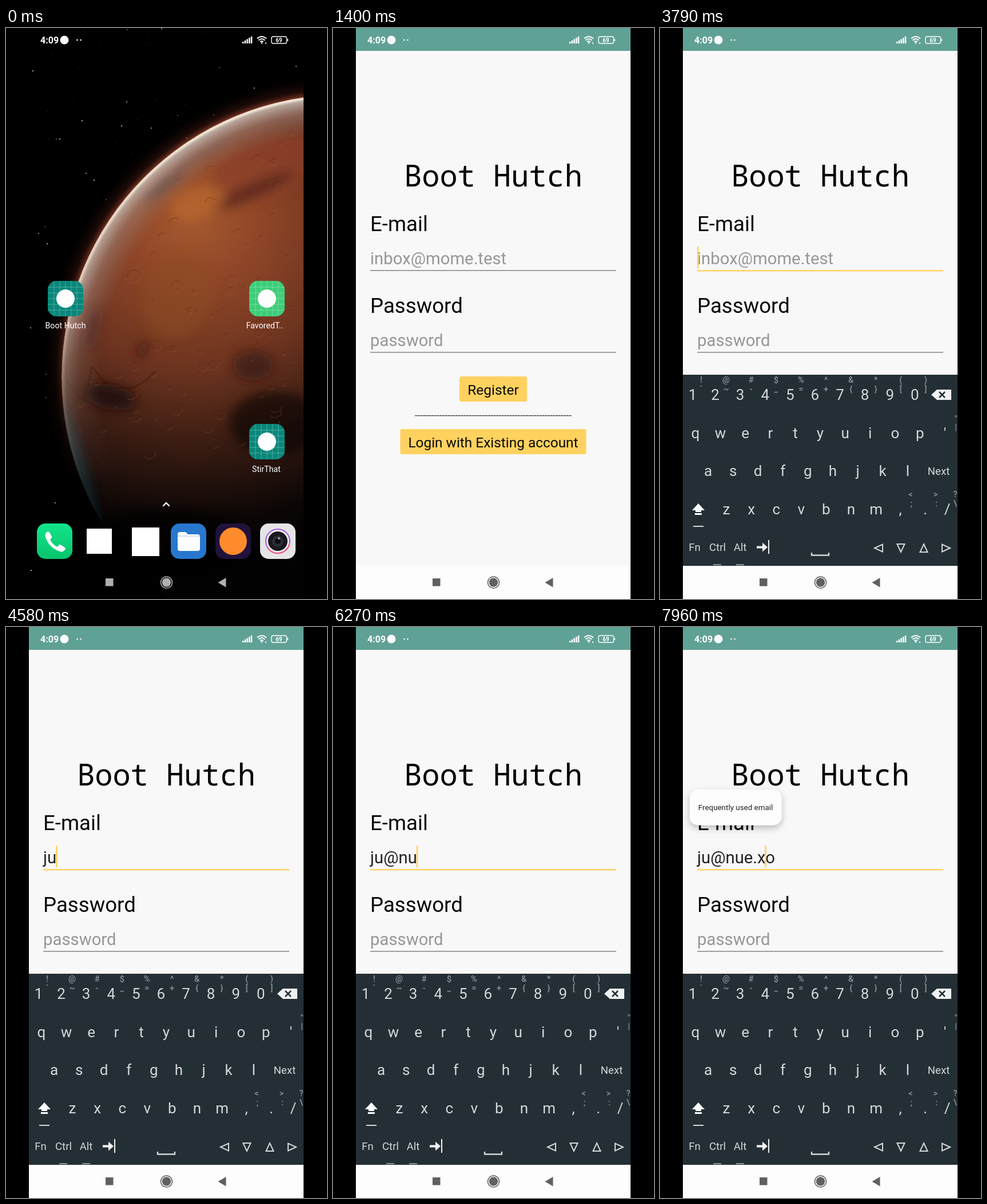
An HTML page that plays this animation: 561 px wide and 998 px high, repeating every 8 s.

```html
<!DOCTYPE html>
<html lang="en">
<head>
<meta charset="utf-8">
<title>Sign-up on a phone</title>
<style>
  html, body { margin: 0; height: 100%; overflow: hidden; background: #000; }
  svg { display: block; width: 561px; height: 998px; font-family: Roboto, sans-serif; }
</style>
</head>
<body>
<svg id="stage" viewBox="0 0 561 998" xmlns="http://www.w3.org/2000/svg">
  <defs>
    <clipPath id="screen"><rect x="40" width="480" height="998"/></clipPath>
    <clipPath id="aboveNav"><rect x="40" width="480" height="940"/></clipPath>
    <clipPath id="window"><rect id="windowRect"/></clipPath>
    <clipPath id="disc"><circle cx="591" cy="610" r="494"/></clipPath>
    <radialGradient id="ground" gradientUnits="userSpaceOnUse" cx="325" cy="330" r="600">
      <stop offset="0" stop-color="#a65a2f"/><stop offset=".2" stop-color="#8f4628"/>
      <stop offset=".45" stop-color="#6b331f"/><stop offset=".68" stop-color="#361a11"/>
      <stop offset=".88" stop-color="#0d0706"/><stop offset="1" stop-color="#020202"/>
    </radialGradient>
    <radialGradient id="rim" gradientUnits="userSpaceOnUse" cx="591" cy="610" r="494">
      <stop offset=".86" stop-color="#94807a" stop-opacity="0"/>
      <stop offset=".94" stop-color="#a08c86" stop-opacity=".5"/>
      <stop offset=".985" stop-color="#c4bab2" stop-opacity=".85"/>
      <stop offset=".995" stop-color="#f6eee0"/><stop offset="1" stop-color="#e8b9a0"/>
    </radialGradient>
    <radialGradient id="halo" gradientUnits="userSpaceOnUse" cx="591" cy="610" r="528">
      <stop offset=".935" stop-color="#94422e" stop-opacity=".75"/>
      <stop offset=".955" stop-color="#5a2016" stop-opacity=".35"/>
      <stop offset="1" stop-color="#200806" stop-opacity="0"/>
    </radialGradient>
    <linearGradient id="fade" gradientUnits="userSpaceOnUse" x1="220" y1="200" x2="220" y2="800">
      <stop offset="0" stop-color="#fff"/><stop offset=".4" stop-color="#ddd"/>
      <stop offset=".75" stop-color="#555"/><stop offset="1" stop-color="#000"/>
    </linearGradient>
    <mask id="lit"><rect width="561" height="998" fill="url(#fade)"/></mask>
    <linearGradient id="green" x2="0" y2="1"><stop stop-color="#12e58a"/><stop offset="1" stop-color="#08c46c"/></linearGradient>
    <filter id="soft" x="-50%" y="-50%" width="200%" height="200%"><feGaussianBlur stdDeviation="9"/></filter>
    <filter id="drop" x="-30%" y="-30%" width="160%" height="180%"><feDropShadow dx="0" dy="5" stdDeviation="6" flood-opacity=".25"/></filter>
  </defs>
  <g id="home" clip-path="url(#screen)"></g>
  <g clip-path="url(#window)"><g id="app"></g></g>
  <g id="keyboard" clip-path="url(#aboveNav)"></g>
  <g id="bars"></g>
</svg>
<script>
const $ = id => document.getElementById(id);
const esc = s => s.replace(/&/g, '&amp;').replace(/</g, '&lt;');
const text = (x, y, s, size, fill, extra = '') =>
  `<text x="${x}" y="${y}" font-size="${size}" fill="${fill}" ${extra}>${esc(s)}</text>`;
const mid = (x, y, s, size, fill, extra = '') => text(x, y, s, size, fill, 'text-anchor="middle" ' + extra);
const rect = (x, y, w, h, fill, extra = '') =>
  `<rect x="${x}" y="${y}" width="${w}" height="${h}" fill="${fill}" ${extra}/>`;
const circle = (x, y, r, fill, extra = '') => `<circle cx="${x}" cy="${y}" r="${r}" fill="${fill}" ${extra}/>`;
const path = (d, fill, extra = '') => `<path d="${d}" fill="${fill}" ${extra}/>`;
const range = (n, f) => Array.from({ length: n }, (_, i) => f(i)).join('');
let seed = 7;
const random = () => (seed = seed * 16807 % 2147483647) / 2147483647;
const clamp = v => Math.min(1, Math.max(0, v));
const progress = (t, from, to) => clamp((t - from) / (to - from));
const easeOut = p => 1 - (1 - p) ** 3;
const show = (id, on) => $(id).setAttribute('visibility', on ? 'inherit' : 'hidden');
const YELLOW = '#ffd25f';

// Home screen
const stars = [373,69, 211,129, 133,162, 300,153, 254,175, 316,192, 363,152, 507,67, 94,194, 88,194, 140,254,
  154,266, 68,347, 57,359, 72,377, 70,605, 86,830, 44,948, 70,646, 43,524, 47,75, 212,3, 272,1, 202,171, 175,300, 434,105];
const patch = (x, y, rx, ry, turn, fill, alpha) =>
  `<ellipse rx="${rx}" ry="${ry}" transform="translate(${x} ${y}) rotate(${turn})" fill="${fill}" opacity="${alpha}"/>`;
const crater = () => {
  const x = 130 + random() * 385, y = 170 + random() * 580, r = 1 + random() ** 4 * 11;
  return path(`M${x - r} ${y}a${r} ${r} 0 0 1 ${r * 1.7} ${-r * .7}`, 'none', 'stroke="#30150c"') +
    path(`M${x + r} ${y}a${r} ${r} 0 0 1 ${-r * 1.7} ${r * .7}`, 'none', 'stroke="#b86c40"');
};
const planet = circle(591, 610, 528, 'url(#halo)', 'mask="url(#lit)"') +
  `<g clip-path="url(#disc)">${circle(591, 610, 494, 'url(#ground)')}<g filter="url(#soft)">` +
  patch(450, 245, 100, 50, -25, '#8a402c', .7) + patch(276, 274, 46, 10, -38, '#40312d', .75) +
  patch(430, 285, 80, 14, -24, '#4c2118', .6) + patch(345, 215, 60, 12, -30, '#6c3a2c', .6) +
  patch(335, 305, 50, 28, -20, '#bd6a30', .6) + patch(300, 470, 60, 75, 20, '#8c4a22', .5) +
  patch(182, 645, 46, 22, 12, '#1d100c', .85) + patch(150, 525, 10, 40, 14, '#40201a', .7) +
  patch(238, 562, 8, 16, 25, '#30170f', .6) + patch(432, 590, 36, 26, 0, '#27130d', .55) +
  patch(470, 690, 80, 55, 0, '#0c0605', .55) + patch(280, 900, 150, 60, 0, '#030202', .7) +
  patch(120, 760, 18, 110, -17, '#14313d', .6) + '</g>' +
  `<g opacity=".35">${range(170, crater)}</g>` +
  path('M104 612l20 30 14 10 12-60 22 26 12 10 36 2 22-12 20-18', 'none', 'stroke="#301008" stroke-width="1.5" opacity=".6"') +
  circle(591, 610, 494, 'url(#rim)', 'mask="url(#lit)"') + '</g>';

const tile = (x, y, fill) => rect(x, y, 62, 62, fill, 'rx="15"');
const gridIcon = (x, y, fill) => tile(x, y, fill) +
  path(range(5, i => `M${x + 11 + i * 10} ${y}v62M${x} ${y + 11 + i * 10}h62`), 'none', 'stroke="#fff" stroke-opacity=".28"') +
  circle(x + 31, y + 31, 16, '#fff');
const dock = tile(54, 866, 'url(#green)') +
  path('M73 880q-6 3-4 10q6 18 25 25q7 2 10-5q0-2-9-7q-2-1-5 4q-9-4-13-13q4-3 3-5q-4-9-7-9z', '#fff') +
  rect(141, 875, 44, 44, '#fff') + rect(220, 873, 48, 50, '#fff') +
  tile(288, 866, '#2877cf') + path('M300 885q0-4 4-4h10l4 4h17q4 0 4 4v21q0 4-4 4h-31q-4 0-4-4z', '#fff') +
  rect(300, 887, 39, 2, '#cfe0f2') +
  tile(366, 866, '#21123c') + circle(397, 897, 24, '#ff8b2c') +
  tile(444, 866, '#e5e4e6') + circle(475, 897, 21, '#f3eff5', 'stroke="#9f56de" stroke-width="2"') +
  path('M457 908a21 21 0 0 0 38-5', 'none', 'stroke="#f2587a" stroke-width="2"') +
  circle(475, 897, 17, '#17191e') + circle(475, 897, 10, '#2a2e38') + circle(475, 897, 5, '#0b0c10') + circle(477, 892, 2, '#98a2b5');

$('home').innerHTML = range(stars.length / 2, i => circle(stars[2 * i], stars[2 * i + 1], .7 + i % 3 * .2, '#ccc')) +
  range(30, () => circle(45 + random() * 300, random() * 230, .5, '#555')) + planet + '<g id="icons">' +
  gridIcon(73, 442, '#08877a') + gridIcon(425, 442, '#3dcd79') + gridIcon(425, 692, '#08877a') +
  mid(104, 525, 'Boot Hutch', 14.2, '#fff') + mid(452, 525, 'FavoredT..', 14.2, '#fff') + mid(455, 776, 'StirThat', 14.2, '#fff') +
  path('M275 835l5-5 5 5', 'none', 'stroke="#fff" stroke-width="2.4" stroke-linecap="round"') + dock + '</g>';

// Sign-up page
const button = (x, y, w, s) => rect(x, y, w, 44, YELLOW, 'rx="3"') + mid(x + w / 2, y + 32, s, 24.4, '#0a0a0a');
$('app').innerHTML = rect(40, 0, 480, 998, '#f8f8f8') + rect(40, 0, 480, 40, '#60a196') + '<g id="form">' +
  mid(280, 277, 'Boot Hutch', 52, '#000', 'style="font-family:\'Noto Sans Mono\',monospace"') +
  text(65, 355, 'E-mail', 36.65, '#0a0a0a') + text(65, 498, 'Password', 36.65, '#0a0a0a') +
  text(65, 413, 'inbox@mome.test', 29.3, '#979797', 'id="hint"') + text(65, 413, '', 29.3, '#222', 'id="input"') +
  rect(65, 423, 430, 1.6, '#8b8b8b', 'id="line"') + rect(65, 382, 2.6, 38, YELLOW, 'id="caret"') +
  text(65, 556, 'password', 29.3, '#979797') + rect(65, 566, 430, 1.6, '#8b8b8b') +
  button(221, 609, 118, 'Register') + mid(280, 683, '-'.repeat(58), 17.1, '#222') +
  button(117.5, 701, 325, 'Login with Existing account') +
  '<g id="tip">' + rect(52, 284, 160.5, 62.5, '#fdfdfd', 'rx="15" filter="url(#drop)"') +
  mid(132, 320, 'Frequently used email', 13.4, '#222') + '</g></g>' + rect(40, 940, 480, 58, '#fdfdfd');

// Keyboard
const PITCH = 43.6, KEY = '#d3d8da', DIM = '#8b959a', ROW = 66.75;
const rowTop = r => 606 + ROW * r;
const labels = (s, x, y) => [...s].map((c, i) => mid(x + PITCH * i, y, c, 26, KEY)).join('');
const hints = (s, x, y) => [...s].map((c, i) => mid(x + PITCH * i, y, c, 14.5, DIM, 'font-weight="500"')).join('');
const layer = (id, digits, change) => `<g id="${id}">` + labels(digits[0], 57, 650) + labels(digits.slice(1), 96.5, 650) +
  labels(change('qwertyuiop'), 62, 717) + labels(change('asdfghjkl'), 84, 783) + labels(change('zxcvbnm'), 116, 850) + '</g>';
const arrow = (x, turn) => path('M-7 0L7-6.5V6.5Z', 'none', `transform="translate(${x} 909) rotate(${turn})" stroke="${KEY}" stroke-width="2"`);
$('keyboard').innerHTML = '<g id="keys">' + rect(40, 606, 480, 334, '#242f35') + rect(0, 0, 44, ROW, '#454c51', 'id="pressed"') +
  layer('lower', '1234567890', s => s) + layer('upper', '!@#$%^&*()', s => s.toUpperCase()) +
  '<g id="hints">' + hints('!@#$%^&*()', 72, 620) + hints('`~-_=+{}[]', 72, 636) +
  hints('"', 517, 688) + hints('|', 517, 703) + hints('<>', 438, 820) + hints(';:', 439.5, 836) +
  hints('?', 516, 820) + hints('\\', 516, 836) + '</g>' +
  mid(498, 717, "'", 26, KEY) + labels(',.', 420, 850) + mid(502, 850, '/', 26, KEY) +
  path('M474 641l10-9h25v18h-25z', '#f0f2f2') + path('M488 636l10 10m0-10l-10 10', 'none', 'stroke="#242f35" stroke-width="2.5"') +
  mid(487, 781, 'Next', 18.6, KEY) + path('M67 831l11 12h-6v3h-10v-3h-6zM61 848h12v3h-12z', '#fff') +
  rect(58, 870, 18, 2, KEY, 'id="shiftBar"') + rect(93, 937, 14, 2, DIM) + rect(133, 937, 14, 2, DIM) +
  mid(60.5, 914, 'Fn', 18.6, KEY) + mid(100.5, 914, 'Ctrl', 18.6, KEY) + mid(140, 914, 'Alt', 18.6, KEY) +
  path('M169 905.5h10v-6l9 8-9 8v-6h-10zM189 895h2v24h-2z', '#f0f2f2') +
  path('M265 917v4.5h30v-4.5', 'none', `stroke="${KEY}" stroke-width="2.4"`) +
  arrow(382, 0) + arrow(421, -90) + arrow(461, 90) + arrow(500, 180) +
  '<g id="popup">' + rect(0, 0, 69, 81, '#000', 'filter="url(#drop)"') +
  range(3, i => circle(47 + i * 6.5, 71, 2.2, '#fff')) + '</g></g>';

// Status and navigation bars
$('bars').innerHTML = '<g fill="#fff">' + text(60, 27, '4:09', 16, '#fff', 'font-weight="600"') + circle(102, 21, 7.5, '#fff') +
  circle(124.5, 21, 1.3, '#fff') + circle(130.5, 21, 1.3, '#fff') +
  range(5, i => rect(413 + i * 3.7, 24 - i * 2.3, 2.5, 3 + i * 2.3, '#fff')) +
  path('M439 18.5q8-7 16 0M441.5 21.5q5.5-5 11 0M444.3 24.3q2.7-2.4 5.4 0', 'none', 'stroke="#fff" stroke-width="2"') +
  circle(447, 26.3, 1.3, '#fff') + circle(454, 26.5, 1.2, '#fff') +
  rect(464, 15, 26.5, 12, 'none', 'rx="3" stroke="#fff" stroke-width="1.4"') + rect(491.5, 19, 1.6, 4, '#fff') +
  mid(477, 24.6, '69', 10, '#fff', 'font-weight="600"') + '</g><g id="nav">' +
  '<path d="M174 962h13.5v13.5h-13.5zM384.5 961v16.5l-14-8.25z"/><circle cx="280.5" cy="969" r="7.7"/>' +
  '<circle cx="280.5" cy="969" r="10" fill="none" stroke="currentColor" stroke-width="1.5"/></g>';

// Key, press time, release time, centre, row; text changes on release
const presses = [['j', 4210, 4310, 345, 2], ['u', 4480, 4580, 323.5, 1], ['shift', 4800, 4900, 67, 3], ['@', 5110, 5210, 105, 0],
  ['n', 5860, 5960, 333.5, 3], ['u', 6150, 6250, 323.5, 1], ['e', 6460, 6560, 149, 1], ['.', 6850, 6950, 464, 3],
  ['x', 7090, 7190, 159, 3], ['o', 7290, 7390, 410.5, 1], ['left', 7520, 7620, 382, 4]];
const widths = { shift: 54, left: 39 };
const LAUNCH = 690, TAP = 2680, FOCUS = 2765;

// The blank window grows out of the icon, then the form appears in it
function drawWindow(t) {
  const p = progress(t, LAUNCH, LAUNCH + 400), e = easeOut(p);
  const x = 73 - 33 * e, y = 442 * (1 - e), w = 62 + 418 * e, h = 62 + 936 * e;
  const box = { x, y, width: w, height: h, rx: 15 + 45 * p * (1 - p) - 15 * p };
  for (const k in box) $('windowRect').setAttribute(k, box[k]);
  $('app').setAttribute('transform', `translate(${x} ${y}) scale(${w / 480}) translate(-40 0)`);
  $('app').setAttribute('opacity', progress(t, LAUNCH, LAUNCH + 100));
  $('form').setAttribute('opacity', progress(t, LAUNCH + 390, LAUNCH + 500));
  $('icons').setAttribute('opacity', 1 - progress(t, LAUNCH, LAUNCH + 200));
  const color = t > LAUNCH + 300 ? '#606060' : '#b0b0b0';
  $('nav').setAttribute('fill', color);
  $('nav').setAttribute('color', color);
}

function drawField(t) {
  let value = '', back = 0, last = FOCUS;
  for (const [key, , release] of presses) {
    if (t < release) break;
    last = release;
    if (key === 'left') back = 1;
    else if (key !== 'shift') value += key;
  }
  const focused = t >= TAP + 20, input = $('input'), count = value.length - back;
  input.textContent = value;
  show('hint', !value);
  $('line').setAttribute('fill', focused ? YELLOW : '#8b8b8b');
  $('line').setAttribute('height', focused ? 2.4 : 1.6);
  $('caret').setAttribute('x', 65 + (count > 0 ? input.getSubStringLength(0, count) - 1 : 0));
  show('caret', t >= FOCUS && (t - last) % 980 < 490);
  $('tip').setAttribute('opacity', progress(t, 7400, 7600));
}

function drawKeyboard(t) {
  const rise = easeOut(progress(t, TAP + 30, 2970));
  $('keys').setAttribute('transform', `translate(0 ${334 * (1 - rise)})`);
  show('keys', t >= TAP);
  const shifted = t >= 4800 && t < 5220;
  show('lower', !shifted);
  show('upper', shifted);
  show('hints', !shifted);
  $('shiftBar').setAttribute('fill', shifted ? YELLOW : KEY);
  const press = presses.find(([, from, to]) => t >= from && t < to);
  show('pressed', press);
  show('popup', press && !widths[press[0]]);
  if (!press) return;
  const [key, , , x, row] = press, w = widths[key] || 44;
  $('pressed').setAttribute('x', x - w / 2);
  $('pressed').setAttribute('y', rowTop(row));
  $('pressed').setAttribute('width', w);
  $('popup').setAttribute('transform', `translate(${x - 34} ${rowTop(row) - 92})`);
}

function frame() {
  const t = performance.now() % 8000;
  drawWindow(t);
  drawField(t);
  drawKeyboard(t);
  requestAnimationFrame(frame);
}
frame();
</script>
</body>
</html>
```
